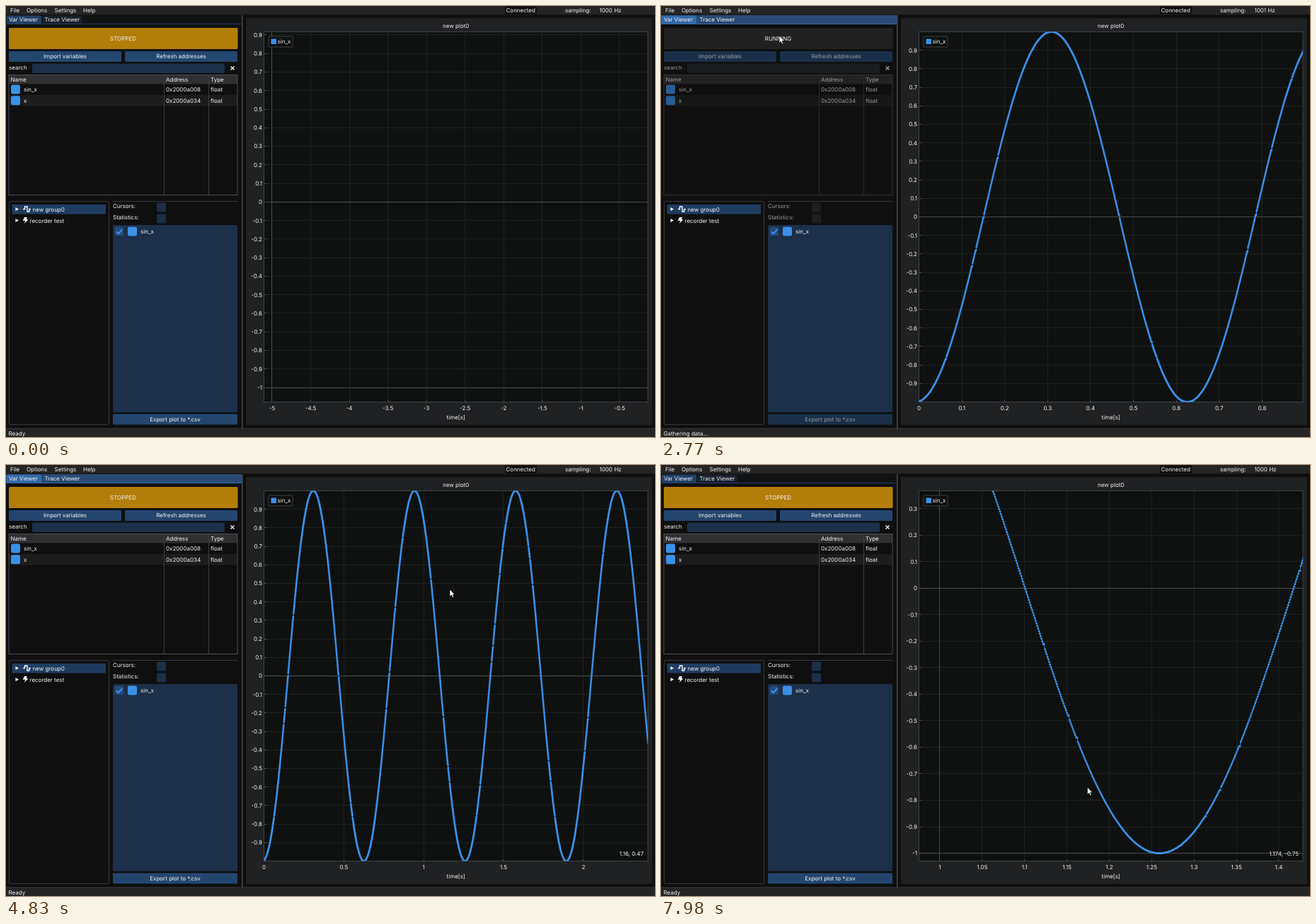
Write an HTML page that moves like this. It is 917x610 px and loops after 8 s.

```html
<!DOCTYPE html>
<html lang="en">
<head>
<meta charset="utf-8">
<title>Variable viewer</title>
<style>
html, body { margin: 0; width: 100%; height: 100%; overflow: hidden; background: #0f0f0f; }
svg { display: block; width: 917px; height: 610px; }
text { font: 8px Inter, "Open Sans", sans-serif; fill: #f4f4f4; text-rendering: geometricPrecision; white-space: pre; }
.off { opacity: .6; }
.off .frame { fill: #26272a; }
.frame { fill: #1d2f49; }
.btn { fill: #23466f; }
.blue { fill: #3b90e8; }
</style>
</head>
<body>
<svg id="stage" viewBox="0 0 917 610" xmlns="http://www.w3.org/2000/svg"></svg>
<script>
const LOOP = 8000;
const TOP = 36.5, BOTTOM = 560.5, RIGHT = 907, LEFT = 364.5;
const START = 1888, END_X = 2.431, PERIOD = 0.63355, PHASE = 0.0081;
const PRESS = 1760, RUN = 1840, STOP = 4292, DRAG = 5960, DROP = 6770;

const rect = (x, y, w, h, attrs = '') => `<rect x="${x}" y="${y}" width="${w}" height="${h}" ${attrs}/>`;
const label = (x, y, s, anchor = 'start', attrs = '') =>
  `<text x="${x}" y="${y + 2.9}" text-anchor="${anchor}" ${attrs}>${s}</text>`;
const line = (x1, y1, x2, y2, color) => `<path d="M${x1} ${y1}L${x2} ${y2}" stroke="${color}"/>`;
const swatch = (x, y) => rect(x, y, 13, 13, 'rx="2.5" class="blue"');
const button = (x, y, w, s) => rect(x, y, w, 15, 'rx="1.5" class="btn"') + label(x + w / 2, y + 7.3, s, 'middle');
const row = (y, name, address) =>
  swatch(7, y - 6.5) + label(25, y, name) + label(226, y, address) + label(289, y, 'float');

const menu = rect(0, 0, 917, 12, 'fill="#242425"') + rect(705, .5, 45, 11, 'fill="#0f0f0f"') +
  label(6, 5.7, 'File') + label(29, 5.7, 'Options') + label(68.5, 5.7, 'Settings') + label(109, 5.7, 'Help') +
  label(706.5, 5.7, 'Connected') + label(790, 5.7, 'sampling:') + label(838.5, 5.7, '1000 Hz', 'start', 'id="rate"');

const tabs = rect(0, 13, 333, 12.5, 'id="bar"') + rect(1, 13.5, 49, 12, 'rx="2" id="tab"') +
  rect(51, 13.5, 56.5, 12, 'rx="2" id="tab2"') + rect(0, 25, 333, 1, 'id="underline"') +
  label(4, 19.3, 'Var Viewer') + label(54.5, 19.3, 'Trace Viewer');

const table = rect(4, 98, 323, 12.5, 'fill="#303033"') + rect(4, 126, 323, 15.5, 'fill="#1d1d1d"') +
  rect(4, 97.5, 323, 170, 'fill="none" stroke="#4b4b51"') +
  line(223.5, 98, 223.5, 267, '#3c3c42') + line(286.5, 98, 286.5, 267, '#3c3c42') +
  label(6.5, 104, 'Name') + label(226, 104, 'Address') + label(289, 104, 'Type') +
  row(118, 'sin_x', '0x2000a008') + row(133.8, 'x', '0x2000a034');

const lockable = `<g id="lock">` + button(4, 64, 159, 'Import variables') + button(168, 64, 159, 'Refresh addresses') +
  label(4, 87, 'search') + rect(37, 81.5, 272, 13.5, 'rx="1.5" class="frame"') +
  '<path d="M317.5 85.5l5 5m0-5l-5 5" stroke="#fff" stroke-width="1.3"/>' + table +
  label(151, 283.5, 'Cursors:') + rect(213, 278.5, 13, 13, 'rx="1.5" class="frame"') +
  label(151, 299.5, 'Statistics:') + rect(213, 294.5, 13, 13, 'rx="1.5" class="frame"') +
  button(151, 577.5, 176, 'Export plot to *.csv') + '</g>';

const arrow = y => `<path d="M13.5 ${y - 2.6}l4.6 2.6-4.6 2.6z" fill="#fff"/>`;
const groups = rect(4.5, 276.5, 141, 316, 'rx="1.5" fill="none" stroke="#38383d"') +
  rect(8.5, 281, 132.5, 13.5, 'fill="#1f3c60"') + arrow(287.5) + arrow(303.5) +
  '<path d="M24 287.5h2.5v-3.5h3.5v7h2.8v-3.5h2.2" fill="none" stroke="#fff" stroke-width="1.4"/>' +
  '<path d="M26 299h4l-1.3 3h2.8l-5.7 6 1.6-4.2h-3.6z" fill="#fff"/>' +
  label(37.5, 287.7, 'new group0') + label(33.5, 303.7, 'recorder test');

const series = line(151, 276.5, 327, 276.5, '#38383d') + rect(151, 310, 176, 265, 'rx="1.5" class="frame"') +
  rect(153.5, 312.8, 12.5, 12.5, 'rx="1.5" fill="#264a78"') +
  '<path d="M155.8 319.4l3 3 5.4-6.2" fill="none" stroke="#4296fa" stroke-width="1.8"/>' +
  swatch(172, 312.5) + label(190, 319.2, 'sin_x');

const stage = document.getElementById('stage');
stage.innerHTML = `<defs><clipPath id="area">${rect(LEFT, TOP, RIGHT - LEFT, BOTTOM - TOP, 'id="areaBox"')}</clipPath></defs>` +
  rect(0, 0, 917, 610, 'fill="#0f0f0f"') + menu + tabs +
  rect(4, 31, 323.5, 30, 'rx="1.5" id="run"') + label(165.5, 46.2, 'STOPPED', 'middle', 'id="state"') +
  lockable + groups + series +
  rect(333, 12, 1.5, 586, 'fill="#49494e"') + rect(0, 12, 917, 1, 'fill="#151516"') +
  rect(339, 17, 574, 576, 'rx="1" fill="#202123"') +
  '<g id="axes"></g><g clip-path="url(#area)" fill="none" stroke="#3b90e8">' +
  '<path id="wire" stroke-width="1"/><path id="dots" stroke-width="3" stroke-linecap="round"/></g><g id="over"></g>' +
  rect(0, 598, 917, 12, 'fill="#242425"') + rect(0, 597.5, 917, 1, 'fill="#3a3a3e"') +
  label(3.5, 605.2, 'Ready', 'start', 'id="status"') +
  '<path id="cursor" d="M0 0V10.2L2.3 8.1 4 11.8 5.7 11 4.1 7.5H7.2Z" fill="#fff" stroke="#000" stroke-width=".6"/>';

const el = id => document.getElementById(id);
const set = (id, attrs) => { for (const k in attrs) el(id).setAttribute(k, attrs[k]); };
const clamp = v => Math.min(1, Math.max(0, v));
const smooth = p => p * p * (3 - 2 * p);
const linear = p => p;

// Interpolates rows of [time, ...values].
function track(keys, t, ease) {
  if (t <= keys[0][0]) return keys[0].slice(1);
  for (let i = 1; i < keys.length; i++) {
    const a = keys[i - 1], b = keys[i];
    if (t < b[0]) {
      const p = ease((t - a[0]) / (b[0] - a[0]));
      return a.slice(1).map((v, j) => v + (b[j + 1] - v) * p);
    }
  }
  return keys[keys.length - 1].slice(1);
}

const pointer = t => track([
  [230, 451, 587], [440, 325, 416], [750, 325, 416], [1450, 167, 42], [3900, 167, 42], [4190, 149, 36],
  [4330, 149, 36], [4805, 627, 176], [5670, 627, 176], [5780, 602.2, 123.4], [5800, 602.5, 119.5],
  [5900, 586, 81], [DRAG, 586, 81], [6590, 682, 425], [7120, 682, 425], [7250, 602.5, 456]
], t, smooth);

const elapsed = t => track([[START, 0], [1980, .0922], [2770, .894], [3510, 1.625], [STOP, 2.404]], t, linear)[0];

const wave = x => -Math.cos(2 * Math.PI * (x + PHASE) / PERIOD);

// Samples every millisecond; now and then the reading repeats the last value.
const samples = [];
for (let i = 0; i <= END_X * 1000; i++) {
  const h = Math.sin(i * 12.9898) * 43758.5453;
  const held = i > 0 && h - Math.floor(h) < .02;
  samples.push(held ? samples[i - 1] : wave(i / 1000));
}

// A view is [x0, x1, y0, y1]; zooming keeps the point under the pixel fixed.
function zoom([x0, x1, y0, y1], k, px, py) {
  const cx = x0 + (x1 - x0) * (px - LEFT) / (RIGHT - LEFT);
  const cy = y1 - (y1 - y0) * (py - TOP) / (BOTTOM - TOP);
  return [cx + (x0 - cx) * k, cx + (x1 - cx) * k, cy + (y0 - cy) * k, cy + (y1 - cy) * k];
}

function viewAt(t) {
  if (t < START) return [-5.105, -.133, -1.078, .917];
  if (t >= DROP) {
    const p = clamp((t - 7250) / 730);
    return zoom([.9754, 1.4284, -1.0293, .3677], 1.66 ** (1 - p), 602.5, 456);
  }
  const x1 = Math.max(.006, elapsed(t));
  const seen = Math.max(.004, x1 - .022);
  const fit = [0, x1, seen > .625 ? -.9999 : wave(0), seen > .3087 ? .9999 : wave(seen)];
  return zoom(fit, 1.766 ** clamp((t - 5180) / 320), 627, 175.4);
}

const pow10 = v => 10 ** Math.floor(Math.log10(v));
function niceCeil(v) {
  const e = pow10(v), f = v / e;
  return e * (f <= 1 ? 1 : f <= 2 ? 2 : f <= 5 ? 5 : 10);
}
function niceRound(v) {
  const e = pow10(v), f = v / e;
  return e * (f < 1.5 ? 1 : f < 3 ? 2 : f < 7 ? 5 : 10);
}
function ticks(lo, hi, parts) {
  const step = niceRound(niceCeil((hi - lo) * .99) / parts) / 10, out = [];
  for (let i = Math.ceil(lo / step - 1e-9); i <= hi / step + 1e-9; i++)
    out.push({ v: i * step, major: i % 10 === 0, s: String(+(i * step).toPrecision(6)).replace(/^-0$/, '0') });
  return out;
}
const decimals = range => 2 - Math.floor(Math.log10(range));

function drawPlot(t) {
  const [x0, x1, y0, y1] = viewAt(t);
  const xs = ticks(x0, x1, 1), ys = ticks(y0, y1, 2);
  const left = 344.5 + 5 * Math.max(4, ...ys.map(k => k.s.length));
  const width = RIGHT - left, mid = (left + RIGHT) / 2;
  const X = v => left + (v - x0) / (x1 - x0) * width;
  const Y = v => BOTTOM - (v - y0) / (y1 - y0) * (BOTTOM - TOP);
  const grid = k => k.major ? '#4a4d4c' : '#1d2120';

  let lines = '', text = '';
  for (const pass of [false, true]) {
    for (const k of xs.filter(k => k.major === pass)) {
      const x = X(k.v), len = k.major ? 5 : 3;
      lines += line(x, TOP, x, BOTTOM, grid(k)) + line(x, BOTTOM - len, x, BOTTOM, '#505352');
      text += label(x, 569, k.s, 'middle');
    }
    for (const k of ys.filter(k => k.major === pass)) {
      const y = Y(k.v), len = k.major ? 5 : 3;
      lines += line(left, y, RIGHT, y, grid(k)) + line(left, y, left + len, y, '#505352');
      text += label(left - 2.5, y, k.s, 'end');
    }
  }
  el('axes').innerHTML = rect(left, TOP, width, BOTTOM - TOP, 'fill="#0e1110"') +
    `<g shape-rendering="crispEdges">${lines}</g>` +
    rect(left, TOP, width, BOTTOM - TOP, 'fill="none" stroke="#424347"') + text +
    label(mid, 28.5, 'new plot0', 'middle') + label(mid, 582, 'time[s]', 'middle');

  let wire = '', dots = '';
  if (t >= START) {
    const from = Math.max(0, Math.floor(x0 * 1000) - 1);
    const to = Math.min(samples.length - 1, Math.ceil(x1 * 1000) + 1);
    for (let i = from; i <= to; i++) {
      const p = X(i / 1000).toFixed(2) + ' ' + Y(samples[i]).toFixed(2);
      wire += (wire ? 'L' : 'M') + p;
      dots += `M${p}h.01`;
    }
  }
  set('wire', { d: wire });
  set('dots', { d: dots });
  set('areaBox', { x: left, width });

  let over = rect(left + 6.5, 43, 34, 15, 'fill="#0f1010" stroke="#3d3e42" rx="1"') +
    rect(left + 10, 46.5, 7.5, 7.5, 'class="blue"') + label(left + 19, 50.5, 'sin_x');
  const [px, py] = pointer(t - 20);
  if (t > STOP && px > left && px < RIGHT && py > TOP && py < BOTTOM) {
    const vx = x0 + (px - left) / width * (x1 - x0);
    const vy = y1 - (py - TOP) / (BOTTOM - TOP) * (y1 - y0);
    over += label(901, 550, `${vx.toFixed(decimals(x1 - x0))}, ${vy.toFixed(decimals(y1 - y0))}`, 'end');
  }
  if (t > DRAG && t < DROP) {
    const [cx, cy] = pointer(t);
    over += rect(586, 81, cx - 586, cy - 81, 'fill="#ff0" fill-opacity=".25" stroke="#ff0"');
  }
  el('over').innerHTML = over;
}

function render(t) {
  const running = t >= RUN && t < STOP;
  const focused = t >= PRESS && t < DRAG;
  const [x, y] = pointer(t);
  const hover = t > 230 && x > 4 && x < 327 && y > 31 && y < 61;

  set('bar', { fill: focused ? '#294a75' : '#111213' });
  set('tab', { fill: focused ? '#3369a8' : '#223f66' });
  set('tab2', { fill: focused ? '#294a75' : '#18202b' });
  set('underline', { fill: focused ? '#3369a8' : '#223f66' });
  set('run', { fill: running ? '#212122' : hover ? '#c48c14' : '#b37d09' });
  set('lock', { class: running ? 'off' : '' });
  el('state').textContent = running ? 'RUNNING' : 'STOPPED';
  el('status').textContent = running ? 'Gathering data...' : 'Ready';
  el('rate').textContent = t >= 1900 && t < 3100 ? '1001 Hz' : '1000 Hz';
  drawPlot(t);
  set('cursor', { transform: `translate(${x} ${y})`, visibility: t < 230 ? 'hidden' : 'visible' });
}

const begin = performance.now();
function tick() {
  render((performance.now() - begin) % LOOP);
  requestAnimationFrame(tick);
}
tick();
</script>
</body>
</html>
```
